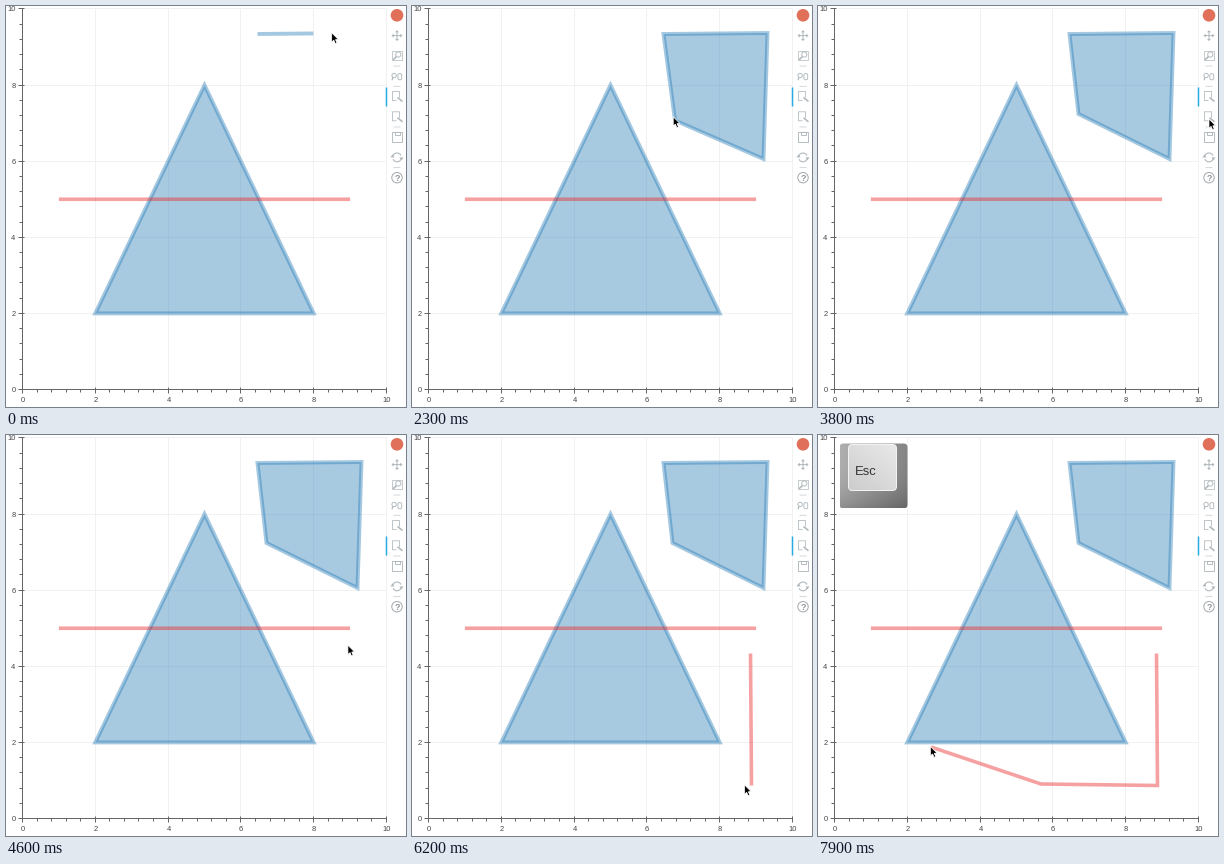
Write a matplotlib script that moves like this. It is 400 by 401 pixels and loops after 8000 ms.

```python
import numpy as np
import matplotlib.pyplot as plt
from matplotlib.animation import FuncAnimation
from matplotlib.patches import Circle, FancyBboxPatch, PathPatch, Polygon, Rectangle
from matplotlib.path import Path

W, H, DPI = 400, 401, 64
STEP, FRAMES = 100, 80
PT = 72 / DPI  # points per pixel

BLUE, RED = "#1f77b4", "#ec2626"
ICON, GRID, AXIS = "#b0b8bc", "#f1f1f1", "#666666"

fig = plt.figure(figsize=(W / DPI, H / DPI), dpi=DPI, facecolor="white")
ax = fig.add_axes([0, 0, 1, 1])
ax.axis("off")


def px(x):
    return 16 + 36.4 * x


def py(y):
    return 383 - 38.05 * y


def line(xs, ys, color=ICON, width=1.0, **kw):
    return ax.plot(xs, ys, color=color, lw=width * PT, snap=False,
                   solid_capstyle="butt", **kw)[0]


def outline(patch, color=ICON, width=0.9, **kw):
    patch.set(fill=False, ec=color, lw=width * PT, **kw)
    return ax.add_patch(patch)


def solid(points, color=ICON):
    ax.add_patch(Polygon(points, color=color, lw=0))


def label(x, y, text, size, **kw):
    return ax.text(x, y, text, family="Liberation Sans", fontsize=size * PT, **kw)


def draw_axes():
    for v in range(2, 11, 2):
        line([round(px(v))] * 2, [2, 383], GRID, zorder=1)
        line([16, 380], [round(py(v))] * 2, GRID, zorder=1)
    line([16, 16], [2, 383], AXIS, zorder=2)
    line([16, 380], [383, 383], AXIS, zorder=2)
    for i in range(26):
        major = i % 5 == 0
        out, inner = (4, 2) if major else (3, 0)
        x, y = round(px(i * 0.4)), round(py(i * 0.4))
        line([x, x], [383 - inner, 383 + out], AXIS, zorder=2)
        line([16 - out, 16 + inner], [y, y], AXIS, zorder=2)
        if major:
            name = str(i * 2 // 5)
            label(x, 395.6, name, 7.5, color="#444444", ha="center")
            label(9, y + 2.7, name, 7.5, color="#444444", ha="right")


def row(i):
    return 8.8 + 20.3 * i


def draw_toolbar():
    cx = 390.5
    ax.add_patch(Circle((cx, row(0)), 6.3, color="#e0705a", lw=0))
    for i in (2.5, 3.5, 5.5, 7.5):
        line([387, 394], [row(i)] * 2, "#d4d8da")

    # pan
    y = row(1)
    for d in np.array([(1, 0), (-1, 0), (0, 1), (0, -1)]):
        mid, side = np.array([cx, y]), 2 * d[::-1]
        line(*zip(mid, mid + 4 * d))
        solid([mid + 5.5 * d, mid + 3.3 * d + side, mid + 3.3 * d - side])

    # box zoom
    y = row(2)
    outline(Rectangle((385.5, y - 5), 10, 9), width=0.7)
    outline(Circle((cx + 1.3, y - 1.4), 2.6))
    line([cx - 0.5, cx - 4], [y + 0.6, y + 4], width=1.6)

    # wheel zoom
    y = row(3)
    outline(Circle((cx - 2.9, y - 0.7), 2.2))
    line([cx - 4, cx - 5], [y + 1, y + 4], width=1.2)
    outline(FancyBboxPatch((cx + 1.5, y - 2), 2.6, 5, boxstyle="round,pad=0.6,rounding_size=1.6"))

    # draw tools
    for y in (row(4), row(5)):
        line([393, 393, 386, 386, 390], [y + 1, y - 5, y - 5, y + 4, y + 4], width=0.8)
        line([391, 396], [y + 1, y + 5], width=1.6)

    # save
    y = row(6)
    outline(Rectangle((cx - 5, y - 5), 10, 10))
    outline(Rectangle((cx - 2.5, y - 5), 5, 3))

    # reset
    y = row(7)
    for s in (1, -1):
        a = np.radians(np.linspace(15, 155, 20))
        line(cx + s * 4.4 * np.cos(a), y + s * 4.4 * np.sin(a), width=1.1)
        solid([(cx + s * 2.5, y), (cx + s * 6.5, y), (cx + s * 4.5, y + s * 3)])

    # help
    outline(Circle((cx, row(8)), 5.2), "#a4aaae", 1)
    label(cx, row(8) + 3.4, "?", 9, color="#8f969a", ha="center", weight="bold")


def blue_patch():
    fill = PathPatch(Path([(0, 0)]), fc=BLUE, alpha=0.39, lw=0, zorder=3)
    edge = PathPatch(Path([(0, 0)]), joinstyle="miter", capstyle="butt", snap=False, zorder=3)
    return ax.add_patch(fill), outline(edge, BLUE, 3.9, alpha=0.4)


def set_patch(parts, pts):
    closed = len(pts) > 2
    path = Path([*pts, pts[0]], closed=True) if closed else Path(pts)
    for part in parts:
        part.set_path(path)
    parts[0].set_visible(closed)


def red_line(xs, ys):
    return line(xs, ys, RED, 3.6, alpha=0.43, solid_joinstyle="miter", zorder=4)


def key_face(x, y, w, h, shade):
    r = 4
    clip = FancyBboxPatch((x + r, y + r), w - 2 * r, h - 2 * r, boxstyle=f"round,pad={r}",
                          fc="none", ec="none")
    ax.add_patch(clip)
    face = ax.imshow(shade, cmap="gray", vmin=0, vmax=1, interpolation="bilinear",
                     extent=(x, x + w, y + h, y), aspect="auto", zorder=6)
    face.set_clip_path(clip)
    return face


def draw_key():
    u, v = np.meshgrid(np.linspace(0, 1, 40), np.linspace(0, 1, 40))
    rim = FancyBboxPatch((34, 13), 40, 38, boxstyle="round,pad=4")
    return [
        key_face(21, 8, 68, 65, 0.68 - 0.16 * u - 0.12 * v ** 3),
        key_face(30, 9, 48, 46, 0.86 + 0.05 * u - 0.06 * v),
        outline(rim, "#f2f2f2", 1, zorder=7),
        label(36, 39, "Esc", 13, color="#333333", zorder=8),
    ]


# Pointer moves: leave time, arrive time, end point
START = (251, 27.5)
MOVES = [
    (-520, 280, (355, 26.5)),
    (700, 1200, (355, 157)),
    (1200, 1400, (351, 152.5)),
    (1700, 2200, (262.5, 114)),
    (2200, 2400, (260, 107.5)),
    (3000, 3800, (391, 113)),
    (4100, 4700, (338, 218)),
    (4900, 5200, (338, 302)),
    (5200, 5550, (339, 350)),
    (6100, 6800, (222.5, 348.5)),
    (7200, 7700, (112.5, 311.5)),
]

# Times at which corners are set; the last one ends the shape
POLY = (-520, 500, 1500, 2600)
PATH = (4800, 5800, 6900, 7800)
SWITCH, KEY_ON = 3900, 7700
TAPS = (*POLY[1:], SWITCH, *PATH[:-1])


def pointer(t):
    pos = np.array(START)
    for leave, arrive, end in MOVES:
        u = np.clip((t - leave) / (arrive - leave), 0, 1)
        pos = pos + (np.array(end) - pos) * u * u * (3 - 2 * u)
    return pos


def corners(times, t):
    pts = [pointer(at) for at in times if at <= t]
    if pts and t < times[-1]:
        pts.append(pointer(t - STEP))  # the open end trails the pointer
    return pts


draw_axes()
draw_toolbar()
set_patch(blue_patch(), [(px(2), py(2)), (px(5), py(8)), (px(8), py(2))])
red_line([px(1), px(9)], [py(5)] * 2)

poly = blue_patch()
path = red_line([], [])
bar = line([380, 380], [81, 100], "#26aae1", 1.5, zorder=5)
key = draw_key()
tap = outline(Circle((0, 0), 14.3), "#1c2530", 1.2, zorder=9)
ARROW = np.array([(0, 0), (0, 9.3), (2.1, 7.4), (3.6, 10.8), (5.2, 10.1), (3.8, 6.8), (6.6, 6.6)])
arrow = ax.add_patch(Polygon(ARROW, fc="black", ec="white", lw=0.7 * PT, zorder=10))
ax.set(xlim=(-0.5, W - 0.5), ylim=(H - 0.5, -0.5))


def update(i):
    t = i * STEP
    pos = pointer(t)
    arrow.set_xy(ARROW + pos - 0.5)
    tap.center = tuple(pos)
    tap.set_visible(any(at <= t < at + 200 for at in TAPS))
    set_patch(poly, corners(POLY, t))
    path.set_data(*np.reshape(corners(PATH, t), (-1, 2)).T)
    top = 81 if t <= SWITCH else 101
    bar.set_ydata([top, top + 19])
    for part in key:
        part.set_visible(t >= KEY_ON)
    return [arrow, tap, *poly, path, bar, *key]


anim = FuncAnimation(fig, update, frames=FRAMES, interval=STEP, repeat=True,
                     repeat_delay=0, blit=False)
plt.show()
```
